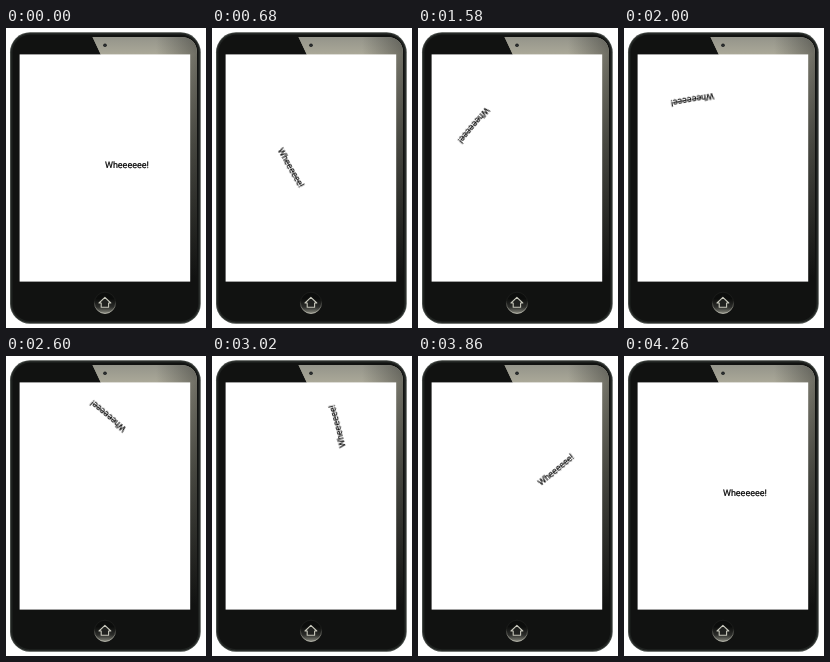
Animation of 200 by 300 pixels, one loop 4300 ms. Source, as an HTML page:

```html
<!DOCTYPE html>
<html lang="en">
<head>
<meta charset="utf-8">
<title>Spinning text on a tablet</title>
<style>
  html, body { margin: 0; width: 100%; height: 100%; overflow: hidden; background: #fff; }
  svg { display: block; width: 200px; height: 300px; }
  .word {
    font: 9px Roboto, Arial, sans-serif;
    stroke: #000;
    stroke-width: .2px;
    text-rendering: geometricPrecision;
    transform-origin: 97.5px 102px;
    animation: spin 4300ms infinite;
  }
  /* Turns in 5 degree ticks, about 60 ms apart, with a few longer pauses */
  @keyframes spin {
    0%     { transform: rotate(0deg);   animation-timing-function: steps(1); }
    1.86%  { transform: rotate(10deg);  animation-timing-function: steps(18); }
    26.97% { transform: rotate(100deg); animation-timing-function: steps(1); }
    28.83% { transform: rotate(105deg); animation-timing-function: steps(7); }
    38.13% { transform: rotate(140deg); animation-timing-function: steps(1); }
    39.99% { transform: rotate(145deg); animation-timing-function: steps(5); }
    46.51% { transform: rotate(170deg); animation-timing-function: steps(1); }
    48.37% { transform: rotate(175deg); animation-timing-function: steps(3); }
    52.09% { transform: rotate(190deg); animation-timing-function: steps(1); }
    53.95% { transform: rotate(195deg); animation-timing-function: steps(5); }
    60.46% { transform: rotate(220deg); animation-timing-function: steps(1); }
    62.32% { transform: rotate(225deg); animation-timing-function: steps(3); }
    66.04% { transform: rotate(240deg); animation-timing-function: steps(10); }
    79.99% { transform: rotate(290deg); animation-timing-function: steps(1); }
    81.86% { transform: rotate(295deg); animation-timing-function: steps(7); }
    91.62% { transform: rotate(330deg); animation-timing-function: steps(1); }
    93.02% { transform: rotate(335deg); animation-timing-function: steps(5); }
    99.06%, 100% { transform: rotate(360deg); }
  }
</style>
</head>
<body>
<svg viewBox="0 0 200 300">
  <defs>
    <linearGradient id="gloss" gradientUnits="userSpaceOnUse" x1="0" y1="9" x2="0" y2="250">
      <stop offset="0" stop-color="#94948a"/>
      <stop offset=".07" stop-color="#aaa898"/>
      <stop offset=".45" stop-color="#64645a"/>
      <stop offset="1" stop-color="#111211"/>
    </linearGradient>
    <linearGradient id="shade" gradientUnits="userSpaceOnUse" x1="150" y1="0" x2="192" y2="0">
      <stop offset="0" stop-color="#111211" stop-opacity="0"/>
      <stop offset="1" stop-color="#111211" stop-opacity=".4"/>
    </linearGradient>
    <linearGradient id="button" x1="0" y1="0" x2="0" y2="1">
      <stop offset=".3" stop-color="#0c0d0c"/>
      <stop offset=".7" stop-color="#2c2d2a"/>
      <stop offset="1" stop-color="#85867c"/>
    </linearGradient>
    <linearGradient id="ring" x1="0" y1="0" x2="0" y2="1">
      <stop offset=".4" stop-color="#1c1d1b"/>
      <stop offset="1" stop-color="#c4c4b8"/>
    </linearGradient>
  </defs>

  <rect x="4" y="4.3" width="190.7" height="291.4" rx="20" fill="#454a46"/>
  <rect x="5" y="5.3" width="188.7" height="289.4" rx="19" fill="#1f2220"/>
  <rect x="6.5" y="6.8" width="185.7" height="286.4" rx="17.5" fill="#111211"/>
  <g id="shine">
    <path id="sheen" d="M86.5 9H174Q191 9 191 26V250H184V27H95Z" fill="url(#gloss)"/>
    <use href="#sheen" style="fill: none"/>
    <path d="M150 9H174Q191 9 191 26V250H184V27H150Z" fill="url(#shade)"/>
  </g>
  <rect x="13.6" y="26.4" width="170.6" height="227.2" fill="#fff"/>

  <circle cx="99" cy="17.3" r="1.8" fill="#1d1f1f"/>
  <circle cx="99" cy="17.3" r=".7" fill="#3c4347"/>

  <circle cx="99" cy="274.8" r="10.6" fill="url(#button)" stroke="url(#ring)" stroke-width=".9"/>
  <path d="M98.9 269.3L93 275H95.2V279.3H102.6V275H104.8Z"
        fill="#20211f" stroke="#c8c8bc" stroke-width="1.1" stroke-linejoin="round"/>

  <text class="word" x="98.9" y="140.2">Wheeeeee!</text>
</svg>
</body>
</html>
```
